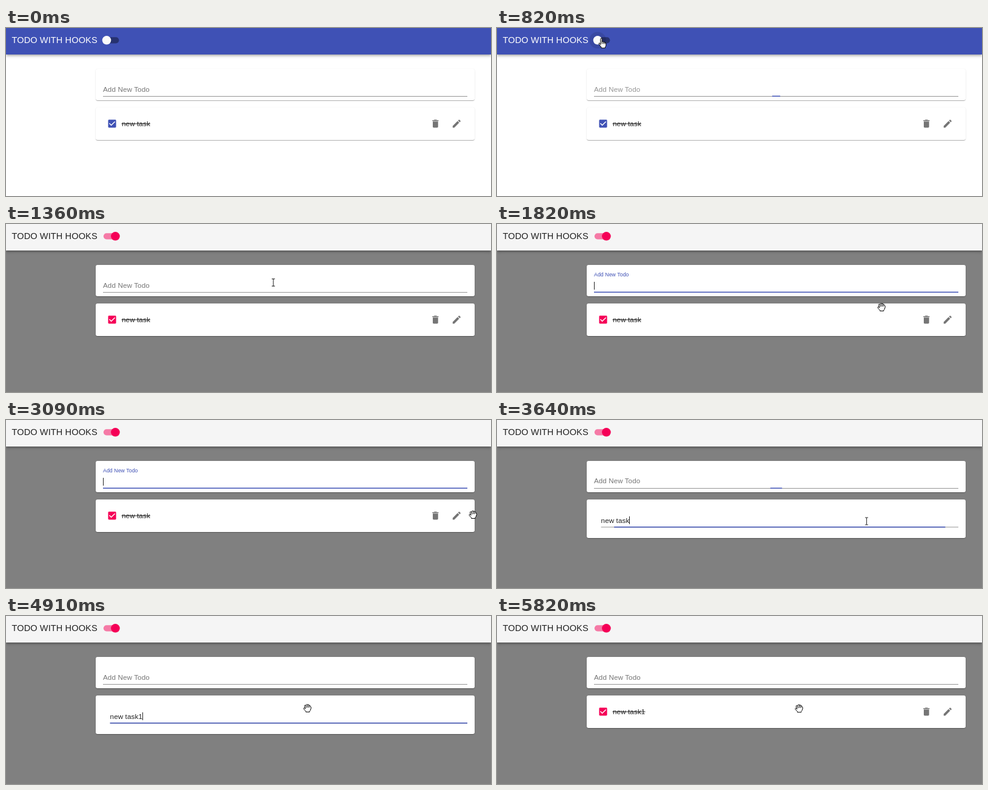
Write an HTML page that moves like this. It is 800 by 279 pixels and loops after 6000 ms.

```html
<!DOCTYPE html>
<html lang="en">
<head>
<meta charset="utf-8">
<title>Todo with hooks</title>
<style>
  html, body { margin: 0; width: 100%; height: 100%; overflow: hidden; }
  #stage { position: relative; width: 800px; height: 279px; overflow: hidden; background: #fff; }
  #stage.dark { background: #808080; }
  #bar { position: absolute; left: 0; top: 0; width: 800px; height: 43.6px; background: #3f51b5;
    box-shadow: 0 1.5px 3px -.7px rgba(0,0,0,.2), 0 3px 3.6px rgba(0,0,0,.14), 0 .7px 7.3px rgba(0,0,0,.12); }
  .dark #bar { background: #f5f5f5; }
  .paper { position: absolute; left: 148px; width: 625px; background: #fff; border-radius: 3px;
    box-shadow: 0 1.5px .7px -.7px rgba(0,0,0,.2), 0 .7px .7px rgba(0,0,0,.14), 0 .7px 2.2px rgba(0,0,0,.12); }
  #add { top: 67.6px; height: 52.6px; }
  #item { top: 131.8px; height: 54.2px; }
  svg { position: absolute; left: 0; top: 0; }
  text { font: 11.65px "Liberation Sans", Arial, sans-serif; letter-spacing: .11px; fill: rgba(0,0,0,.87); }
  #title { font-size: 14.56px; fill: #fff; }
  .dark #title { fill: rgba(0,0,0,.87); }
  #check { fill: #3f51b5; }
  .dark #check { fill: #f50057; }
  .icon { fill: #757575; }
  .rule { fill: #949494; }
  .focus { fill: #3f51b5; }
  .caret { fill: #222; }
  .cursor { fill: #fff; stroke: #000; stroke-width: 1; stroke-linejoin: round; stroke-linecap: round; }
</style>
</head>
<body>
<div id="stage">
  <div id="bar"></div>
  <div id="add" class="paper"></div>
  <div id="item" class="paper"></div>
  <svg width="800" height="279" viewBox="0 0 800 279">
    <text id="title" x="9.5" y="25.4">TODO WITH HOOKS</text>
    <rect id="track" x="160.8" y="15.2" width="25.6" height="10.2" rx="5.1"/>
    <circle id="halo" cy="20.3" r="13.8"/>
    <circle id="thumb" cy="20.3" r="7.3"/>

    <text id="label">Add New Todo</text>
    <rect class="rule" x="160" y="113" width="601" height="1"/>
    <rect id="addFocus" class="focus" y="112.5" height="1.5"/>
    <rect id="addCaret" class="caret" x="160" y="96" width="1" height="13"/>

    <g id="view">
      <path id="check" transform="translate(166.3 150.1) scale(.728)" d="M19 3H5c-1.11 0-2 .9-2 2v14c0 1.1.89 2 2 2h14c1.11 0 2-.9 2-2V5c0-1.1-.89-2-2-2zm-9 14l-5-5 1.41-1.41L10 14.17l7.59-7.59L19 8l-9 9z"/>
      <text id="task" x="191" y="162.6"></text>
      <rect id="strike" x="190.5" y="158.5" height="1" fill="#222"/>
      <circle id="hover" cx="743.3" cy="159" r="17.4" fill="rgba(0,0,0,.05)"/>
      <path class="icon" transform="translate(699.6 150.1) scale(.728)" d="M6 19c0 1.1.9 2 2 2h8c1.1 0 2-.9 2-2V7H6v12zM19 4h-3.5l-1-1h-5l-1 1H5v2h14V4z"/>
      <path class="icon" transform="translate(734.6 150.1) scale(.728)" d="M3 17.25V21h3.75L17.81 9.94l-3.75-3.75L3 17.25zM20.71 7.04c.39-.39.39-1.02 0-1.41l-2.34-2.34c-.39-.39-1.02-.39-1.41 0l-1.83 1.83 3.75 3.75 1.83-1.83z"/>
    </g>

    <g id="edit">
      <text id="field" x="171.6" y="170.7"></text>
      <rect class="rule" x="171.6" y="177.4" width="589.4" height="1"/>
      <rect id="editFocus" class="focus" y="177" height="1.5"/>
      <rect id="editCaret" class="caret" y="160" width="1" height="13"/>
    </g>

    <g id="arrow" class="cursor"><path d="M-5-8V5.5L-2 3 0 7.5 2 6.6 .2 2.4H4.3Z"/></g>
    <g id="ibeam"><path d="M-2.5-6H-.7L0-5.4 .7-6H2.5M0-5.4V5.4M-2.5 6H-.7L0 5.4 .7 6H2.5" fill="none" stroke="#333" stroke-width="1.1"/></g>
    <g id="pointer" class="cursor"><path d="M-3.2 2.2V-6.6Q-3.2-8-2-8T-.8-6.6V-2.2Q.9-3.2 1.6-1.6 3-2.4 3.8-.8 5.8-1.4 5.8 1V3.6Q5.8 5.4 4.4 6.6V8.2H-2V6.8Q-4.2 4.6-5.8 1.6-6.4 .2-5.2 0-4.2 0-3.2 2.2Z"/><path d="M-.8-2.2V1M1.6-1.4V1M3.8-.6V1.2" fill="none"/></g>
    <g id="hand" class="cursor"><path d="M-3.2 .8-4.6-3.4Q-4.8-4.8-3.6-4.9-2.6-4.9-2.2-3.6L-1.8-5.2Q-1.5-6.4-.4-6.3 .7-6.2 .7-5-.1-5.5 1.7-5.9 3-6 3.1-4.3 4.7-4.8 5.2-3.5V-1.8Q6.7-2 6.3-.3L5.2 3.2Q4.8 4.3 3.8 5V6.4H-2.4V5.2Q-4.4 3.4-5.9 1.2-6.5 0-5.4-.4-4.3-.5-3.2 .8Z"/><path d="M-2.2-3.6-1.5-.9M.7-5V-1.3M3.1-4.3 2.9-1.2" fill="none"/></g>
  </svg>
</div>
<script>
const LOOP = 6000, STEP = 1000 / 11;
const $ = id => document.getElementById(id);
const stage = $('stage');
const kinds = ['arrow', 'ibeam', 'pointer', 'hand'];

// time, x, y, shape
const path = [
  [90, 431, 101, 'ibeam'], [180, 395, 84, 'arrow'], [360, 285, 50, 'arrow'],
  [545, 186, 27, 'pointer'], [636, 174, 25, 'pointer'], [820, 174, 25, 'pointer'],
  [909, 200.5, 41, 'pointer'], [1000, 245, 58, 'arrow'], [1360, 440, 97, 'ibeam'],
  [1545, 490, 104, 'ibeam'], [1636, 540, 135, 'hand'], [1727, 592, 152, 'hand'],
  [1818, 634, 138, 'hand'], [2000, 705, 137, 'hand'], [2090, 724, 124, 'ibeam'],
  [2270, 729, 109, 'ibeam'], [2450, 725, 113.5, 'ibeam'], [2545, 725, 113.5, 'ibeam'],
  [2636, 725, 114.5, 'ibeam'], [2818, 725, 114.5, 'ibeam'], [2909, 742, 130, 'hand'],
  [3090, 770, 157, 'hand'], [3180, 776, 165, 'hand'], [3272, 765, 170, 'hand'],
  [3363, 749, 169, 'pointer'], [3454, 745, 167, 'pointer'], [3545, 725, 167, 'pointer'],
  [3636, 610, 168, 'ibeam'], [3909, 331, 168.5, 'ibeam'], [4090, 327.5, 174, 'ibeam'],
  [4363, 327.5, 174, 'ibeam'], [4454, 327, 174.5, 'ibeam'], [4545, 327, 174.5, 'ibeam'],
  [4636, 350, 171, 'ibeam'], [4727, 405, 164, 'ibeam'], [4818, 468, 156, 'hand'],
  [4909, 497, 153, 'hand'], [5000, 497, 153, 'hand'], [5090, 498, 153.5, 'hand'],
  [LOOP, 498, 153.5, 'hand']
];

const ramp = (t, start, length) => Math.min(1, Math.max(0, (t - start) / length));
const easeOut = p => 1 - (1 - p) ** 3;
const easeInOut = p => p * p * (3 - 2 * p);
const within = (t, a, b) => t >= a && t < b;
const mix = (a, b, p) => a + (b - a) * p;

function set(id, attrs) {
  for (const name in attrs) $(id).setAttribute(name, attrs[name]);
}
function show(id, on) {
  $(id).style.display = on ? '' : 'none';
}
function setText(id, value) {
  if ($(id).textContent !== value) $(id).textContent = value;
}
function focusLine(id, left, width, scale) {
  set(id, { x: left + width * (1 - scale) / 2, width: width * scale });
}

function drawCursor(t) {
  const next = path.findIndex(p => p[0] > t);
  const from = next > 0 ? path[next - 1] : null;
  for (const kind of kinds) show(kind, from && kind === from[3]);
  if (!from) return;
  const to = path[next], p = ramp(t, from[0], to[0] - from[0]);
  const x = mix(from[1], to[1], p), y = mix(from[2], to[2], p);
  set(from[3], { transform: `translate(${x} ${y})` });
}

function drawSwitch(t, dark) {
  const x = mix(166, 180.4, easeInOut(ramp(t, 815, 150)));
  const fade = dark ? 1 - ramp(t, 960, 180) : ramp(t, 500, 90);
  set('thumb', { cx: x, fill: dark ? '#f50057' : '#fafafa' });
  set('track', { fill: dark ? '#f50057' : '#000', 'fill-opacity': dark ? .5 : .38 });
  set('halo', { cx: x, fill: dark ? '#d8003c' : '#000', 'fill-opacity': .1 * fade });
}

function drawAdd(t) {
  const brief = within(t, 815, 905);
  const focused = within(t, 1440, 3540);
  const p = focused ? easeOut(ramp(t, 1440, 200))
    : t >= 3540 ? 1 - easeOut(ramp(t, 3500, 200)) : 0;
  const lift = brief ? .03 : p;
  const scale = mix(1, .75, lift);
  set('label', { transform: `translate(160 ${mix(106.1, 87, lift)}) scale(${scale})` });
  $('label').style.fill = focused ? '#3f51b5' : brief ? '#949494' : '#757575';
  focusLine('addFocus', 160, 601, brief ? .022 : p);
  show('addCaret', focused && !within(t, 2360, 2900) && t < 3440);
}

function drawItem(t) {
  const editing = within(t, 3540, 5722);
  const typed = t >= 4720;
  const text = typed ? 'new task1' : 'new task';
  show('view', !editing);
  show('edit', editing);
  $('item').style.height = editing ? '64.2px' : '54.2px';
  setText('task', text);
  setText('field', text);
  set('strike', { width: typed ? 54 : 47.5 });
  show('hover', within(t, 3330, 3540));
  focusLine('editFocus', 171.6, 589.4, easeOut(ramp(t, 3520, 200)));
  set('editCaret', { x: typed ? 225 : 218 });
  show('editCaret', !within(t, 4080, 4630) && t < 5265);
}

function draw(now) {
  const t = Math.floor((now % LOOP + 4) / STEP) * STEP % LOOP;
  const dark = t >= 905;
  stage.classList.toggle('dark', dark);
  drawSwitch(t, dark);
  drawAdd(t);
  drawItem(t);
  drawCursor(t);
}

const start = performance.now();
function tick() {
  draw(performance.now() - start);
  requestAnimationFrame(tick);
}
tick();
</script>
</body>
</html>
```
